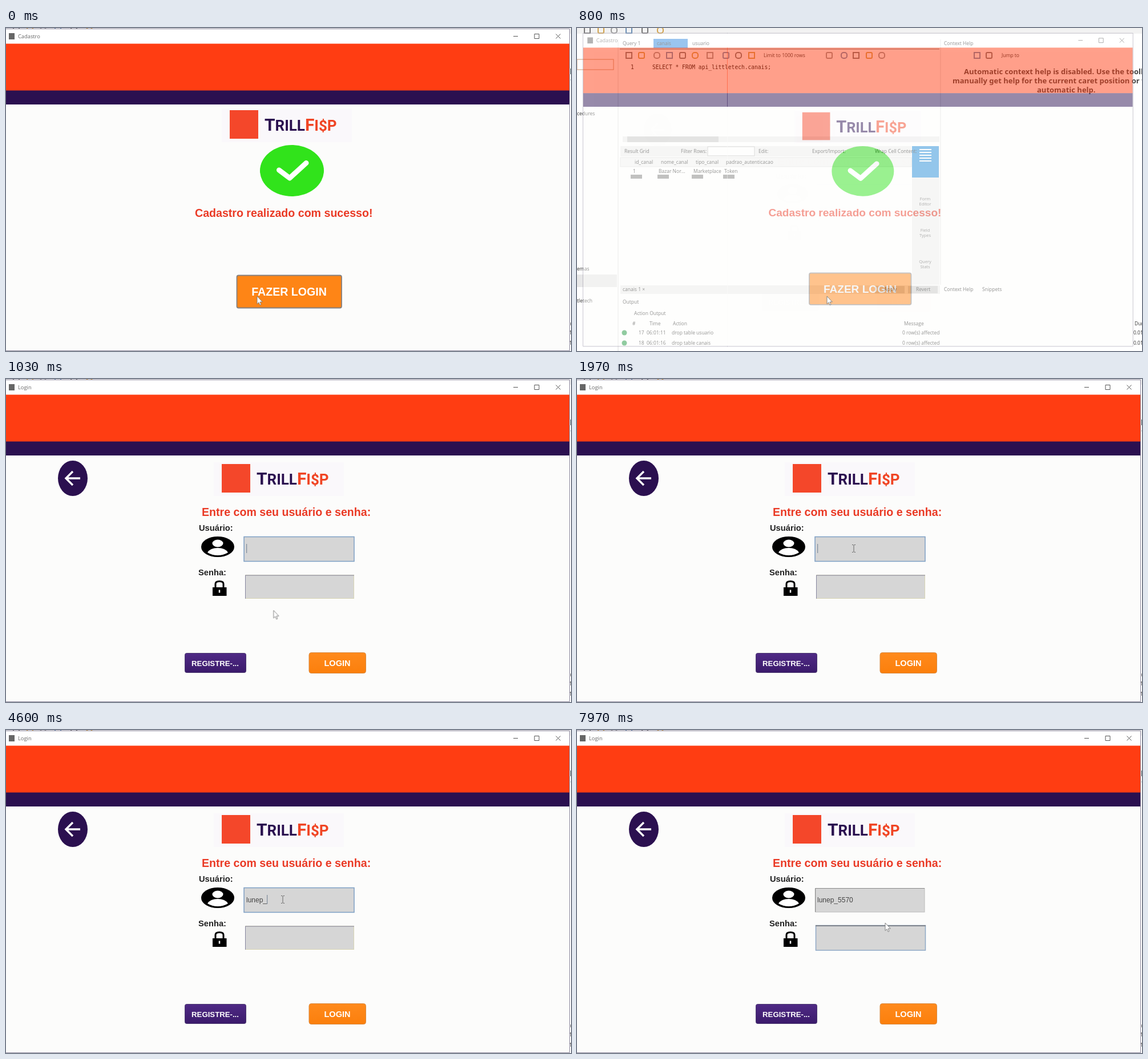
Animation, 990 px wide and 566 px high, one loop 8 s. Source, as an HTML page:

```html
<!DOCTYPE html>
<html lang="pt-BR">
<head>
<meta charset="utf-8">
<title>Login</title>
<style>
html, body { margin: 0; width: 100%; height: 100%; overflow: hidden; background: #fff; }
svg { display: block; width: 100%; height: 100%; }
text { font-family: "Liberation Sans", Arial, sans-serif; }
.ide text { font: 8.5px "Open Sans", sans-serif; fill: #333; }
.ide .code { font: 9.6px "DejaVu Sans Mono", monospace; fill: #111; }
.ide .help { font: bold 13px "Noto Sans", sans-serif; fill: #444; }
.ide .side { font-size: 7.5px; text-anchor: middle; fill: #666; }
.bar { font: 9.3px "Open Sans", sans-serif; fill: #666; }
.brand { font: bold 26px Roboto, sans-serif; fill: #2b1050; }
.brand .cap { font-size: 30px; }
.brand .hot { fill: #f04524; }
.title { font-size: 19.6px; font-weight: bold; fill: #ea3a25; }
.label { font-size: 14.7px; font-weight: bold; fill: #222; }
.btn { font-weight: bold; fill: #fff; text-anchor: middle; }
.entry { font-size: 12px; fill: #444; }
.field .on, .field.focus .off { display: none; }
.field.focus .on { display: inline; }

.old, .new, .pointer, .arrow, .beam { animation: 8s linear infinite; }
.old { animation-name: close; transform-origin: 495px 283px; }
.new { animation-name: open; transform-origin: 470px 242px; }
.pointer { animation-name: move; }
.arrow { animation-name: arrow; animation-timing-function: step-end; }
.beam { animation-name: beam; animation-timing-function: step-end; }

@keyframes close {
  0%, 9% { opacity: 1; transform: none; }
  10.875% { opacity: .05; transform: scale(.95); }
  11.1%, 100% { opacity: 0; transform: scale(.94); }
}
@keyframes open {
  0%, 10% { opacity: 0; transform: scale(.93); }
  10.875% { opacity: .73; transform: scale(.982); }
  12.25%, 100% { opacity: 1; transform: none; }
}
@keyframes move {
  0% { transform: translate(440px, 470px); }
  6.25%, 10.9% { transform: translate(438px, 470px); }
  12.9% { transform: translate(469px, 405px); }
  15.6%, 86% { transform: translate(485px, 297px); }
  91.9%, 92.8% { transform: translate(546px, 362px); }
  96.5%, 100% { transform: translate(540px, 338px); }
}
@keyframes arrow { 0% { opacity: 1; } 15% { opacity: 0; } 88.1% { opacity: 1; } 90.1% { opacity: 0; } 95.9%, 100% { opacity: 1; } }
@keyframes beam { 0% { opacity: 0; } 15% { opacity: 1; } 88.1% { opacity: 0; } 90.1% { opacity: 1; } 95.9%, 100% { opacity: 0; } }
</style>
</head>
<body>
<svg viewBox="0 0 990 566" preserveAspectRatio="none">
  <defs>
    <linearGradient id="violet" x2="0" y2="1"><stop stop-color="#4f2a85"/><stop offset="1" stop-color="#3b1a6b"/></linearGradient>
    <linearGradient id="amber" x2="0" y2="1"><stop stop-color="#ff8a1c"/><stop offset="1" stop-color="#fb7f0c"/></linearGradient>
    <g id="frame">
      <rect x="-3" y="1" width="990" height="565" fill="#fcfcfb"/>
      <rect x="-3" y="2" width="990" height="25.500" fill="#fff"/>
      <rect x="-3" y="27.500" width="990" height="82.500" fill="#ff3d12"/>
      <rect x="-3" y="109.500" width="990" height="24.500" fill="#2b1050"/>
      <path d="M-3 1.500H987.500V565.500H-3Z" fill="none" stroke="#8d889c"/>
      <rect x="5" y="9" width="10" height="11" fill="#666"/>
      <path d="M889 14.500h8M926 10.500h8v8h-8zM963.500 10.500l8 8m0-8l-8 8" fill="none" stroke="#555"/>
    </g>
    <g id="brand">
      <rect x="364" y="146" width="228" height="59" fill="#faf8fb"/>
      <rect x="378" y="149" width="50" height="50" fill="#f4472a"/>
      <text class="brand" x="439" y="185"><tspan class="cap">T</tspan>RILL<tspan class="hot"><tspan class="cap">F</tspan>I$P</tspan></text>
    </g>
  </defs>

  <g class="ide">
    <rect width="990" height="566" fill="#fff"/>
    <rect width="990" height="10" fill="#f2f2f2"/>
    <g id="tools"></g>
    <rect x="75" y="36" width="560" height="1.500" fill="#999"/>
    <rect x="134" y="19" width="60" height="16" fill="#3b8fe0"/>
    <rect x="0" y="55" width="64" height="18" fill="none" stroke="#c97"/>
    <path d="M72 20V566M637 20V450" stroke="#ddd"/>
    <rect x="80" y="190" width="555" height="10" fill="#eee"/>
    <rect x="88" y="190" width="160" height="10" fill="#ccc"/>
    <rect x="76" y="207" width="510" height="18" fill="#f0f0f0"/>
    <rect x="229" y="208" width="82" height="16" fill="#fff" stroke="#bbb"/>
    <rect x="76" y="227" width="510" height="16" fill="#f4f4f4" stroke="#ddd"/>
    <rect x="587" y="207" width="48" height="243" fill="#f0f0f0"/>
    <rect x="587" y="207" width="47" height="55" fill="#2f93dc"/>
    <path d="M600 213h21M600 218h21M600 223h21M600 228h21M600 233h21" stroke="#fff" stroke-width="2"/>
    <rect x="76" y="451" width="560" height="15" fill="#eee"/>
    <rect x="522" y="452" width="52" height="13" fill="#ccc"/>
    <rect x="580" y="452" width="52" height="13" fill="#ccc"/>
    <rect x="0" y="432" width="70" height="22" fill="#e8e8e8"/>
    <path d="M94 257h20v7h-20zM141 257h20v7h-20zM201 257h20v7h-20zM256 257h20v7h-20z" fill="#888"/>
    <circle cx="83" cy="534" r="4.500" fill="#2a9d4a"/><circle cx="83" cy="552" r="4.500" fill="#2a9d4a"/>
    <g id="ideText"></g>
  </g>

  <g class="new">
    <use href="#frame"/>
    <text class="bar" x="21" y="18">Login</text>
    <use href="#brand"/>
    <ellipse cx="117" cy="174" rx="26" ry="31" fill="#2b1050"/>
    <path d="M130 174H106M117 162L105 174L117 186" fill="none" stroke="#fff" stroke-width="3.500"/>
    <text class="title" x="343" y="240">Entre com seu usuário e senha:</text>
    <text class="label" x="338" y="266">Usuário:</text>
    <text class="label" x="337" y="344">Senha:</text>
    <ellipse cx="371" cy="294" rx="29" ry="18"/>
    <ellipse cx="371" cy="288" rx="9.500" ry="6.500" fill="#fff"/>
    <path d="M353 304Q358 296 371 296T389 304Q381 309 371 309T353 304Z" fill="#fff"/>
    <rect x="362" y="365" width="24.500" height="15"/>
    <path d="M367 366V359Q367 354.500 374 354.500T381 359V366" fill="none" stroke="#000" stroke-width="3"/>
    <path d="M374 369.500v5" stroke="#fff" stroke-width="2.500"/>
    <g class="field" id="user">
      <g class="on"><rect x="417" y="276.500" width="193" height="43" fill="#d6d6d6" stroke="#7d9fc4" stroke-width="1.500"/></g>
      <g class="off"><rect x="418" y="277.500" width="191" height="41.500" fill="#d6d6d6" stroke="#bbb"/><path d="M417.500 319V277.500H609" fill="none" stroke="#888"/></g>
    </g>
    <g class="field" id="pass">
      <g class="on"><rect x="418.500" y="342.500" width="192" height="43.500" fill="#d6d6d6" stroke="#8fa9c6" stroke-width="1.500"/><path d="M418 343h193" stroke="#7e848c" stroke-width="2"/></g>
      <g class="off"><rect x="419.500" y="343.500" width="190" height="41" fill="#d6d6d6" stroke="#d8d5b4"/><path d="M419.500 385V344H610" fill="none" stroke="#86869f"/></g>
    </g>
    <text class="entry" id="entry" x="421" y="302"></text>
    <rect id="caret" width="1.200" height="16" fill="#7e8b9b"/>
    <rect x="313.500" y="480.500" width="107" height="34" rx="3" fill="url(#violet)" stroke="#4c3a70"/>
    <text class="btn" x="366.500" y="503" font-size="13.200">REGISTRE-...</text>
    <rect x="531" y="479.500" width="99.500" height="36" rx="4" fill="url(#amber)" stroke="#d98a40"/>
    <text class="btn" x="580.500" y="503" font-size="14.600">LOGIN</text>
  </g>

  <g class="old">
    <use href="#frame"/>
    <text class="bar" x="21" y="18">Cadastro</text>
    <use href="#brand" x="14" y="-5"/>
    <ellipse cx="501" cy="250" rx="56" ry="45" fill="#31e31b"/>
    <path d="M478.500 249L497 263L526 236.500" fill="none" stroke="#fff" stroke-width="9" stroke-linecap="round" stroke-linejoin="round"/>
    <text class="title" x="331" y="331">Cadastro realizado com sucesso!</text>
    <rect x="404.500" y="433.500" width="183.500" height="57" rx="3" fill="#fe8516" stroke="#85807f" stroke-width="1.800"/>
    <text class="btn" x="496" y="469" font-size="19.600">FAZER LOGIN</text>
  </g>

  <g class="pointer">
    <path class="arrow" d="M0 0V13.500L3 10.800L5 15.500L7 14.600L5 10H9.300Z" fill="#fff" stroke="#777" stroke-width=".9"/>
    <path class="beam" d="M-3 -6.500H-1L0 -5.500L1 -6.500H3M0 -5.500V5.500M-3 6.500H-1L0 5.500L1 6.500H3" fill="none" stroke="#666"/>
  </g>
</svg>
<script>
const NS = 'http://www.w3.org/2000/svg';
const byId = id => document.getElementById(id);
function add(parent, tag, attrs, text = '') {
  const el = document.createElementNS(NS, tag);
  for (const key in attrs) el.setAttribute(key, attrs[key]);
  el.textContent = text;
  parent.append(el);
}

// Each line: y, class, then pairs of x and text.
const lines = [
  [30, '', 80, 'Query 1', 140, 'canais', 202, 'usuario', 643, 'Context Help'],
  [51, '', 327, 'Limit to 1000 rows', 744, 'Jump to'],
  [72, 'code', 94, '1', 132, 'SELECT * FROM api_littletech.canais;'],
  [81, 'help', 678, 'Automatic context help is disabled. Use the toolbar to'],
  [97, 'help', 658, 'manually get help for the current caret position or to'],
  [113, 'help', 806, 'automatic help.'],
  [153, '', 0, 'cedures'],
  [219, '', 83, 'Result Grid', 182, 'Filter Rows:', 318, 'Edit:', 412, 'Export/Import:', 522, 'Wrap Cell Content:'],
  [238, '', 101, 'id_canal', 147, 'nome_canal', 208, 'tipo_canal', 261, 'padrao_autenticacao'],
  [254, '', 98, '1', 143, 'Bazar Nor...', 204, 'Marketplace', 258, 'Token'],
  [302, 'side', 610, 'Form'], [311, 'side', 610, 'Editor'],
  [357, 'side', 610, 'Field'], [366, 'side', 610, 'Types'],
  [412, 'side', 610, 'Query'], [421, 'side', 610, 'Stats'],
  [425, '', 0, 'emas'], [481, '', 0, 'tletech'],
  [461, '', 80, 'canais 1  ×', 538, 'Apply', 594, 'Revert', 643, 'Context Help', 710, 'Snippets'],
  [483, '', 80, 'Output'], [503, '', 100, 'Action Output'],
  [521, '', 97, '#', 127, 'Time', 168, 'Action', 573, 'Message', 977, 'Duration'],
  [537, '', 108, '17', 122, '06:01:11', 166, 'drop table usuario', 570, '0 row(s) affected', 975, '0.016 sec'],
  [555, '', 108, '18', 122, '06:01:16', 166, 'drop table canais', 570, '0 row(s) affected', 975, '0.015 sec']
];
for (const [y, cls, ...items] of lines)
  for (let i = 0; i < items.length; i += 2)
    add(byId('ideText'), 'text', { x: items[i], y, class: cls }, items[i + 1]);

const tints = ['#777', '#d2a24c', '#999', '#6b8fb5'];
function icons(y, xs) {
  xs.forEach((x, i) => add(byId('tools'), 'rect',
    { x: x - 5, y: y - 5, width: 10, height: 10, rx: i % 3 * 2, fill: 'none', stroke: tints[i % 4], 'stroke-width': 2 }));
}
icons(4, [18, 42, 65, 91, 119, 146]);
icons(48, [91, 113, 140, 162, 185, 207, 233, 261, 283, 306, 442, 468, 489, 512, 534, 701, 722]);
icons(216, [144, 169, 348, 371, 394, 482, 504]);

// Every key press or click restarts the caret blink.
const typed = 'lunep_55730', fixed = 'lunep_5570', passFocus = 7400;
const keys = [
  [0, ''], [850, ''], [2400, ''],
  ...[...typed].map((_, i) => [3500 + i * 210, typed.slice(0, i + 1)]),
  [6450, typed.slice(0, -1)], [6600, typed.slice(0, -2)], [6850, fixed], [passFocus, fixed]
];
const entry = byId('entry'), caret = byId('caret');
let start;
function draw(now) {
  start ??= now;
  const t = (now - start) % 8000;
  const [at, value] = keys.findLast(key => key[0] <= t);
  const onPass = t >= passFocus;
  if (entry.textContent !== value) entry.textContent = value;
  byId('user').classList.toggle('focus', !onPass);
  byId('pass').classList.toggle('focus', onPass);
  caret.setAttribute('x', onPass ? 423 : 421 + (value ? entry.getComputedTextLength() : 0));
  caret.setAttribute('y', onPass ? 357 : 289);
  caret.style.opacity = (t - at) % 1000 < 500 ? 1 : 0;
  requestAnimationFrame(draw);
}
requestAnimationFrame(draw);
</script>
</body>
</html>
```
